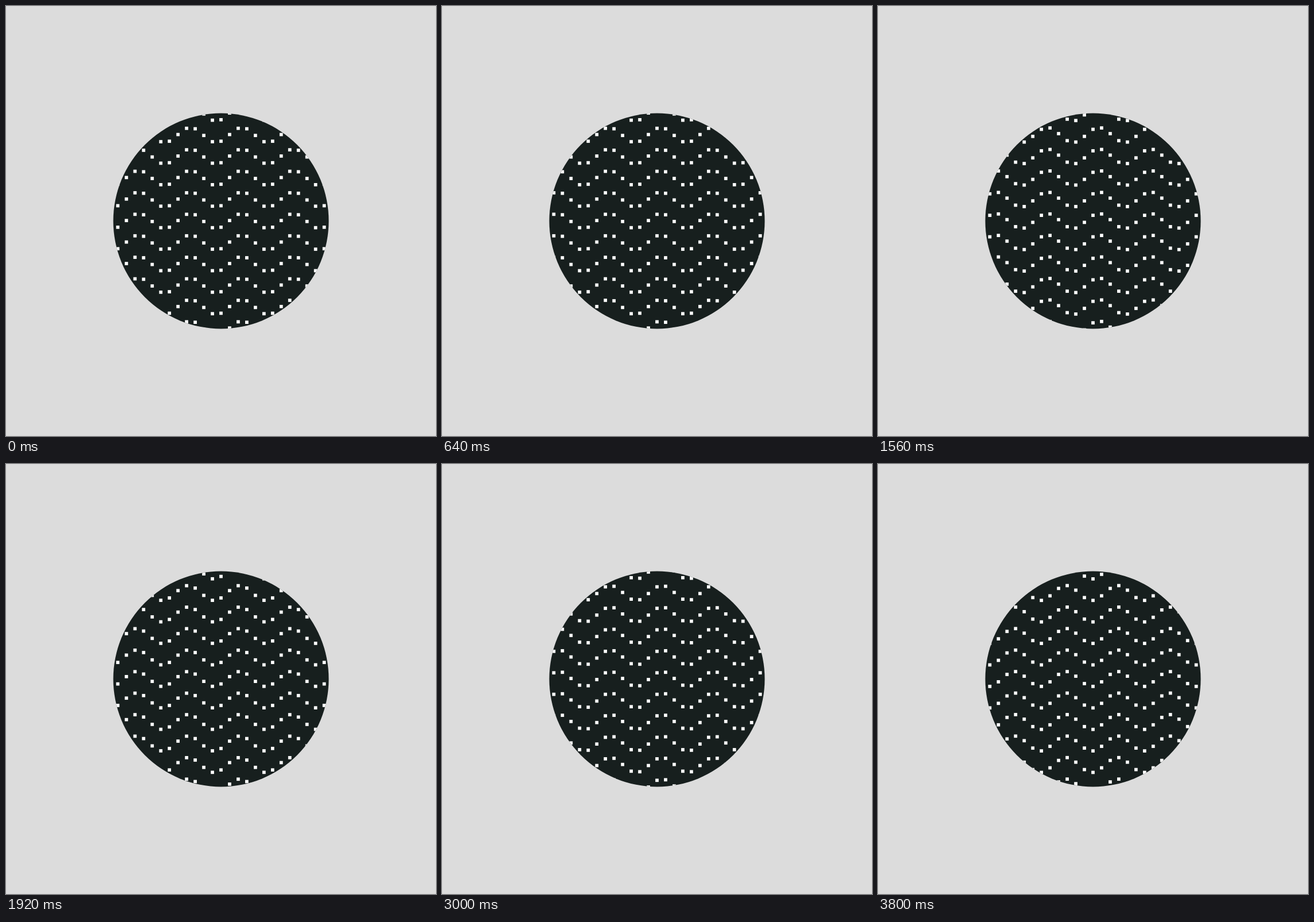
Write an HTML page with a canvas that moves like this. It is 748x748 px and loops after 3.84 s.

```html
<!DOCTYPE html>
<html lang="en">
<head>
<meta charset="utf-8">
<title>Wave of dots</title>
<style>
  html, body { margin: 0; width: 100%; height: 100%; overflow: hidden; background: #dcdcdc; }
  canvas { display: block; }
</style>
</head>
<body>
<canvas id="stage" width="748" height="748"></canvas>
<script>
const ctx = document.getElementById('stage').getContext('2d');
const SIZE = 748, CENTER = SIZE / 2, RADIUS = 187.4;
const COLUMN = SIZE / 50, ROW = SIZE / 20;
const DOT = 5.7, AMPLITUDE = 13;
const LOOP = 3840, STEP = 40;

// The wave drifts left, turns, then runs right: [step, phase in degrees]
const path = [[0, 326.4], [16, 206.4], [27, 156.6], [48, 311.4], [60, 446.4], [75, 574.2], [95, 712.2]];

const last = path.length - 1;
const speed = i => (path[i + 1][1] - path[i][1]) / (path[i + 1][0] - path[i][0]);

function tangent(i) {
  if (i === 0) return 2 * speed(0) - tangent(1);
  if (i === last) return 2 * speed(last - 1) - tangent(last - 1);
  const before = path[i][0] - path[i - 1][0];
  const after = path[i + 1][0] - path[i][0];
  return (speed(i - 1) * after + speed(i) * before) / (before + after);
}

// Cubic Hermite interpolation along the path
function phaseAt(step) {
  let i = 0;
  while (i < last - 1 && step >= path[i + 1][0]) i++;
  const [start, from] = path[i], [end, to] = path[i + 1];
  const span = end - start, s = (step - start) / span, r = 1 - s;
  return from + (to - from) * s * s * (3 - 2 * s)
    + span * s * r * (r * tangent(i) - s * tangent(i + 1));
}

function draw(ms) {
  const phase = phaseAt(Math.floor((ms % LOOP) / STEP));
  ctx.fillStyle = '#dcdcdc';
  ctx.fillRect(0, 0, SIZE, SIZE);

  ctx.save();
  ctx.beginPath();
  ctx.arc(CENTER, CENTER, RADIUS, 0, Math.PI * 2);
  ctx.fillStyle = '#171f1e';
  ctx.fill();
  ctx.clip();
  ctx.fillStyle = '#fff';
  for (let col = -13; col <= 13; col++) {
    const x = CENTER + col * COLUMN;
    const lift = AMPLITUDE * Math.cos((col * 60 - phase) * Math.PI / 180);
    for (let row = -6; row <= 6; row++) {
      const y = CENTER + row * ROW + lift;
      ctx.fillRect(x - DOT / 2, y - DOT / 2, DOT, DOT);
    }
  }
  ctx.restore();
}

const began = performance.now();
function tick() {
  draw(performance.now() - began);
  requestAnimationFrame(tick);
}
tick();
</script>
</body>
</html>
```
